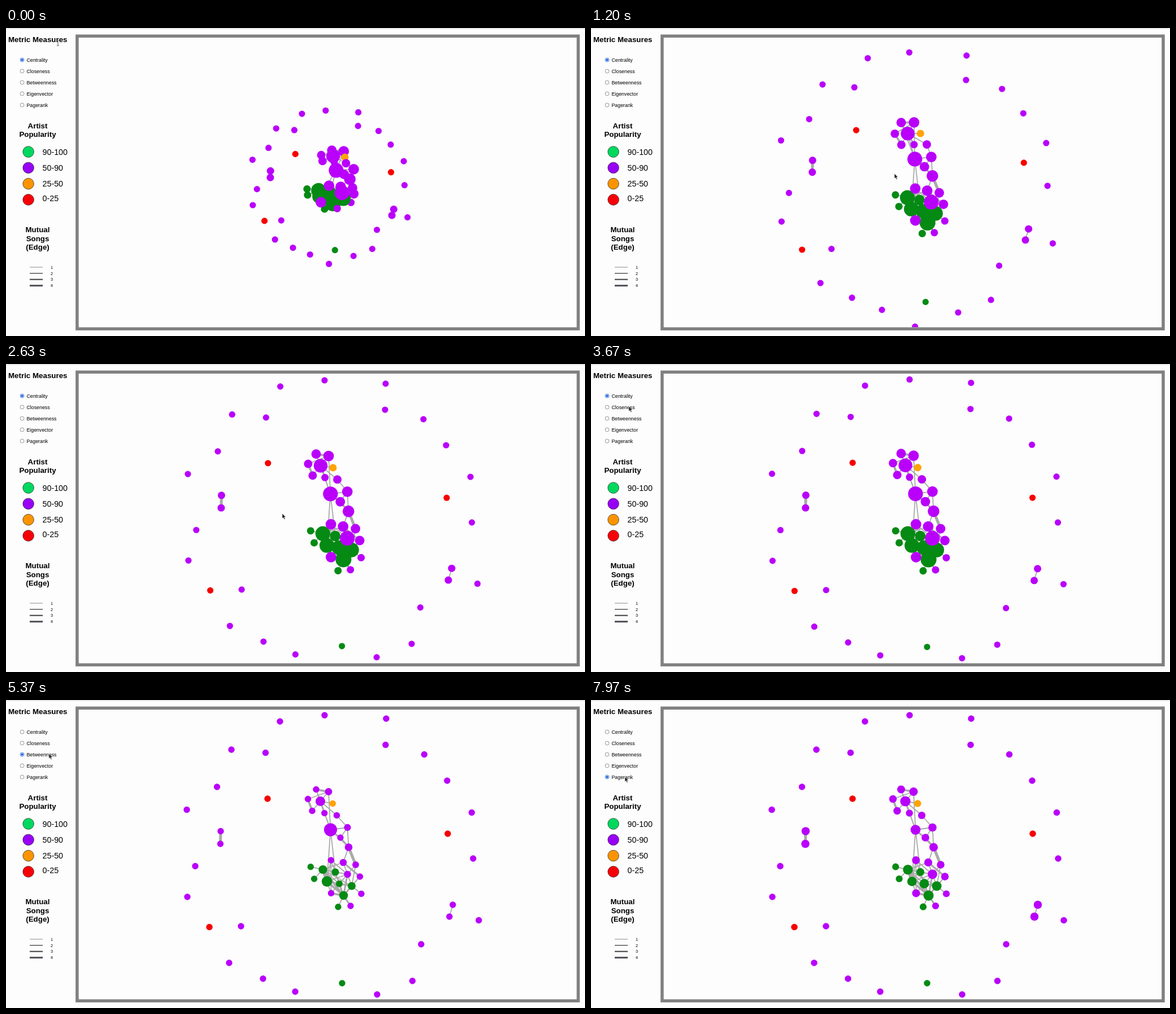
An HTML page that plays this animation: 1025x546 px, repeating every 8000 ms.

```html
<!DOCTYPE html>
<html lang="en">
<head>
<meta charset="utf-8">
<title>Artist network</title>
<style>
  html, body { margin: 0; width: 100%; height: 100%; overflow: hidden; background: #fdfdfd; }
  svg { display: block; width: 1025px; height: 546px; font-family: "Liberation Sans", Arial, sans-serif; }
  .head { font-weight: bold; font-size: 13.33px; }
  .mid { text-anchor: middle; }
  .label { font-size: 8.85px; }
  .range { font-size: 14.3px; }
  .count { font-size: 7.3px; }
</style>
</head>
<body>
<svg viewBox="0 0 1025 546">
  <defs><clipPath id="box"><rect x="128.5" y="17" width="882" height="513.5"/></clipPath></defs>
  <rect width="1025" height="546" fill="#fdfdfd"/>
  <rect width="1025" height="1.3" y=".6" fill="#dedede"/>
  <g clip-path="url(#box)"><g id="links" stroke="#aaa"></g><g id="nodes"></g></g>
  <rect x="125.9" y="14.3" width="887.1" height="519" fill="none" stroke="#808080" stroke-width="5.5"/>
  <text class="head" x="4" y="25">Metric Measures</text>
  <g class="head mid">
    <text x="56" y="177.5">Artist</text><text x="56" y="193">Popularity</text>
    <text x="56" y="362">Mutual</text><text x="56" y="377.7">Songs</text><text x="56" y="393">(Edge)</text>
  </g>
  <g id="menu"></g>
  <g id="legend"></g>
  <path id="beam" d="M-2-4.5Q0-4.5 0-3.5Q0-4.5 2-4.5M0-3.5V3.5M-2 4.5Q0 4.5 0 3.5Q0 4.5 2 4.5" fill="none" stroke="#333" stroke-width=".8"/>
  <path id="arrow" d="M0 0V9L2.1 7.2L3.6 10.5L5.1 9.8L3.6 6.6H6.4Z" fill="#222" stroke="#fff" stroke-width=".5"/>
</svg>
<script>
const LOOP = 8000, MID = 630;
const PURPLE = '#b900fa', GREEN = '#058a14', RED = '#f60000', ORANGE = '#ffa305';
const $ = id => document.getElementById(id);
const mix = (a, b, k) => a + (b - a) * k;
const sum = list => list.reduce((a, b) => a + b, 0);

function set(el, attrs) {
  for (const k in attrs) el.setAttribute(k, attrs[k]);
}
function add(parent, tag, attrs, text = '') {
  const el = document.createElementNS('http://www.w3.org/2000/svg', tag);
  set(el, attrs);
  el.textContent = text;
  return parent.appendChild(el);
}

// Sidebar
const radios = ['Centrality', 'Closeness', 'Betweenness', 'Eigenvector', 'Pagerank'].map((name, i) => {
  const cy = 56.5 + 20 * i;
  add($('menu'), 'text', { class: 'label', x: 36.4, y: cy + 3.4 }, name);
  return {
    ring: add($('menu'), 'circle', { cx: 28.5, cy, r: 3.4, fill: '#fff', 'stroke-width': .8 }),
    dot: add($('menu'), 'circle', { cx: 28.5, cy, r: 2.1, fill: '#1558d6' })
  };
});
[['90-100', '#00d85f'], ['50-90', '#9800f5'], ['25-50', '#fb9400'], ['0-25', '#f80008']].forEach(([name, fill], i) => {
  const cy = 219.5 + 28.3 * i;
  add($('legend'), 'circle', { cx: 39.6, cy, r: 9.8, fill, stroke: '#222', 'stroke-width': .7 });
  add($('legend'), 'text', { class: 'range', x: 64.5, y: cy + (i < 3 ? 5.1 : 2.6) }, name);
});
['#888', '#666', '#555', '#4d4d55'].forEach((stroke, i) => {
  const y = 424 + 10.9 * i;
  add($('legend'), 'path', { d: `M42 ${y}H65`, stroke, 'stroke-width': 1 + .66 * i });
  add($('legend'), 'text', { class: 'count', x: 79, y: y + 2.6 }, String(i + 1));
});

// Resting layout. Loose nodes: one green, three red, the rest purple; the last four form two pairs.
const loose = [
  [595, 502], [463, 175], [782, 237], [360, 402.5], [485, 38], [564, 27], [673, 33], [399, 88],
  [459.5, 93.5], [672, 79.5], [740.5, 96.5], [781, 143], [824.5, 199.5], [373.5, 154], [320, 194.5], [335, 294.5],
  [321, 349], [416, 401], [395, 466], [455, 494], [512, 517], [575, 549], [657, 522], [719.5, 498],
  [735, 433], [837, 390.5], [827, 281], [380, 232.5], [379.5, 255], [791, 363], [785, 384]
];
// Linked nodes: A-T, and green a-i.
const linked = [
  [549, 158.5], [571, 162.5], [534.5, 175.5], [556.5, 179.5], [578.3, 183.5], [542, 196.5], [563.7, 200.5], [585.5, 204.5],
  [574.5, 230], [604.5, 226], [592, 244], [606.5, 261], [575.3, 284], [597, 288], [619, 292], [604.5, 309],
  [626.5, 313], [575.5, 342.5], [629, 343.5], [610, 365],
  [539.3, 295.7], [545.6, 317], [561, 300.7], [583, 305], [568.2, 321.7], [590, 325.7], [612, 329.7], [597.6, 346.6], [588, 366.7]
];
const names = 'ABCDEFGHIJKLMNOPQRSTabcdefghi';
const songs = {
  1.8: 'AD AI BC BD BI DE DF DH DI HJ IJ IK IL Id Ie JK JL LN MP MR Me Mf NP Nc OP Og Pd Pe Pf Pg Qg Qh Re Rf Sg ac bc cd cf cg df ef eg hi',
  3: 'DG KL NQ fg gh hP hT fh',
  3.8: 'AB CF hR eh ch',
  5: 'LO ce'
};

const nodes = [], edges = [], byName = {};
function addNode(poses, fill) {
  const node = { id: nodes.length, poses, near: [], el: add($('nodes'), 'circle', { fill }) };
  nodes.push(node);
  return node;
}
function addEdge(a, b, width) {
  a.near.push(b);
  b.near.push(a);
  edges.push({ a, b, el: add($('links'), 'line', { 'stroke-width': width }) });
}

// Each node has a start, a middle and a resting pose.
loose.forEach(([x, y], i) => addNode([
  [mix(568, x, .53), mix(276, y, .52)],
  [mix(556, x, .838), mix(264, y, .84)],
  [x, y]
], i === 0 ? GREEN : i < 4 ? RED : PURPLE));
addEdge(nodes[27], nodes[28], 5);
addEdge(nodes[29], nodes[30], 1.8);

// The upper group swings into place, the lower one only widens.
// S lies below the green nodes, the other purple nodes above them.
for (const n of 'SabcdefghiABCDEFGHIJKLMNOPQRT') {
  const [x, y] = linked[names.indexOf(n)];
  byName[n] = addNode([
    [x - .25 * (y - 270), mix(275, y, .5)],
    y < 215 ? [x + .45 * (y - 158), y - .45 * (x - 596)] : [mix(525, x, .94), mix(300, y, .92)],
    [x, y]
  ], n === 'E' ? ORANGE : n >= 'a' ? GREEN : PURPLE);
}
for (const w in songs) songs[w].split(' ').forEach(([a, b]) => addEdge(byName[a], byName[b], w));

// Network measures
function search(from) {
  const dist = nodes.map(() => Infinity), ways = nodes.map(() => 0), queue = [from];
  dist[from.id] = 0;
  ways[from.id] = 1;
  for (const a of queue) for (const b of a.near) {
    if (dist[b.id] === Infinity) {
      dist[b.id] = dist[a.id] + 1;
      queue.push(b);
    }
    if (dist[b.id] === dist[a.id] + 1) ways[b.id] += ways[a.id];
  }
  return { dist, ways, reach: queue };
}
const trees = nodes.map(search);

const closeness = trees.map(({ dist, reach }) =>
  reach.length > 1 ? (reach.length - 1) ** 2 / sum(reach.map(n => dist[n.id])) : 0);

const betweenness = nodes.map(() => 0);
trees.forEach((s, i) => s.reach.forEach(({ id: t }) => s.reach.forEach(({ id: v }) => {
  if (v !== i && v !== t && s.dist[v] + trees[v].dist[t] === s.dist[t])
    betweenness[v] += s.ways[v] * trees[v].ways[t] / s.ways[t];
})));

let eigen = nodes.map(() => 1), rank = eigen;
for (let i = 0; i < 80; i++) {
  eigen = nodes.map(n => eigen[n.id] + sum(n.near.map(m => eigen[m.id])));
  const top = Math.max(...eigen);
  eigen = eigen.map(v => v / top);
  rank = nodes.map(n => .15 + .85 * sum(n.near.map(m => rank[m.id] / m.near.length)));
}

const scale = (values, span) => values.map(v => 5.7 + span * v / Math.max(...values));
const radii = [
  nodes.map(n => 5.6 + .94 * n.near.length),
  scale(closeness, 5.5),
  scale(betweenness, 5.8),
  scale(eigen, 7),
  rank.map(v => 5.5 + 1.75 * v)
];

// Time, x, y of the pointer
const path = [
  [0, 92, 27], [100, 92, 27], [560, 557, 256], [800, 557, 256], [1830, 498, 262], [2500, 489, 265], [2900, 489, 265],
  [3550, 67, 75], [4350, 67, 75], [4750, 76, 95], [5870, 76, 95], [6150, 70, 116], [6450, 70, 116], [6950, 60, 136], [LOOP, 60, 136]
];
const clicks = [0, 3900, 4900, 6250, 7700];

function pointer(t) {
  const i = Math.max(1, path.findIndex(p => p[0] >= t));
  const [t0, x0, y0] = path[i - 1], [t1, x1, y1] = path[i];
  const k = (t - t0) / (t1 - t0), e = k * k * (3 - 2 * k);
  return [mix(x0, x1, e), mix(y0, y1, e)];
}

// Fast spread to the middle pose, then exponential settling.
function place(node, t) {
  const early = t < MID;
  const k = early
    ? (1 - Math.exp(-.00181 * t)) / (1 - Math.exp(-.00181 * MID))
    : 1 - Math.exp(-.00148 * (t - MID));
  const [from, to] = node.poses.slice(early ? 0 : 1);
  node.x = mix(from[0], to[0], k);
  node.y = mix(from[1], to[1], k);
}

function draw(t) {
  const mode = clicks.filter(c => c <= t).length - 1;
  nodes.forEach(n => {
    place(n, t);
    set(n.el, { cx: n.x, cy: n.y, r: radii[mode][n.id] });
  });
  edges.forEach(({ a, b, el }) => set(el, { x1: a.x, y1: a.y, x2: b.x, y2: b.y }));
  radios.forEach(({ ring, dot }, i) => {
    set(ring, { stroke: i === mode ? '#1558d6' : '#777' });
    set(dot, { visibility: i === mode ? 'visible' : 'hidden' });
  });
  const transform = `translate(${pointer(t)})`, beam = t < 110;
  set($('beam'), { transform, visibility: beam ? 'visible' : 'hidden' });
  set($('arrow'), { transform, visibility: beam ? 'hidden' : 'visible' });
}

const begin = performance.now();
function tick() {
  draw((performance.now() - begin) % LOOP);
  requestAnimationFrame(tick);
}
tick();
</script>
</body>
</html>
```
